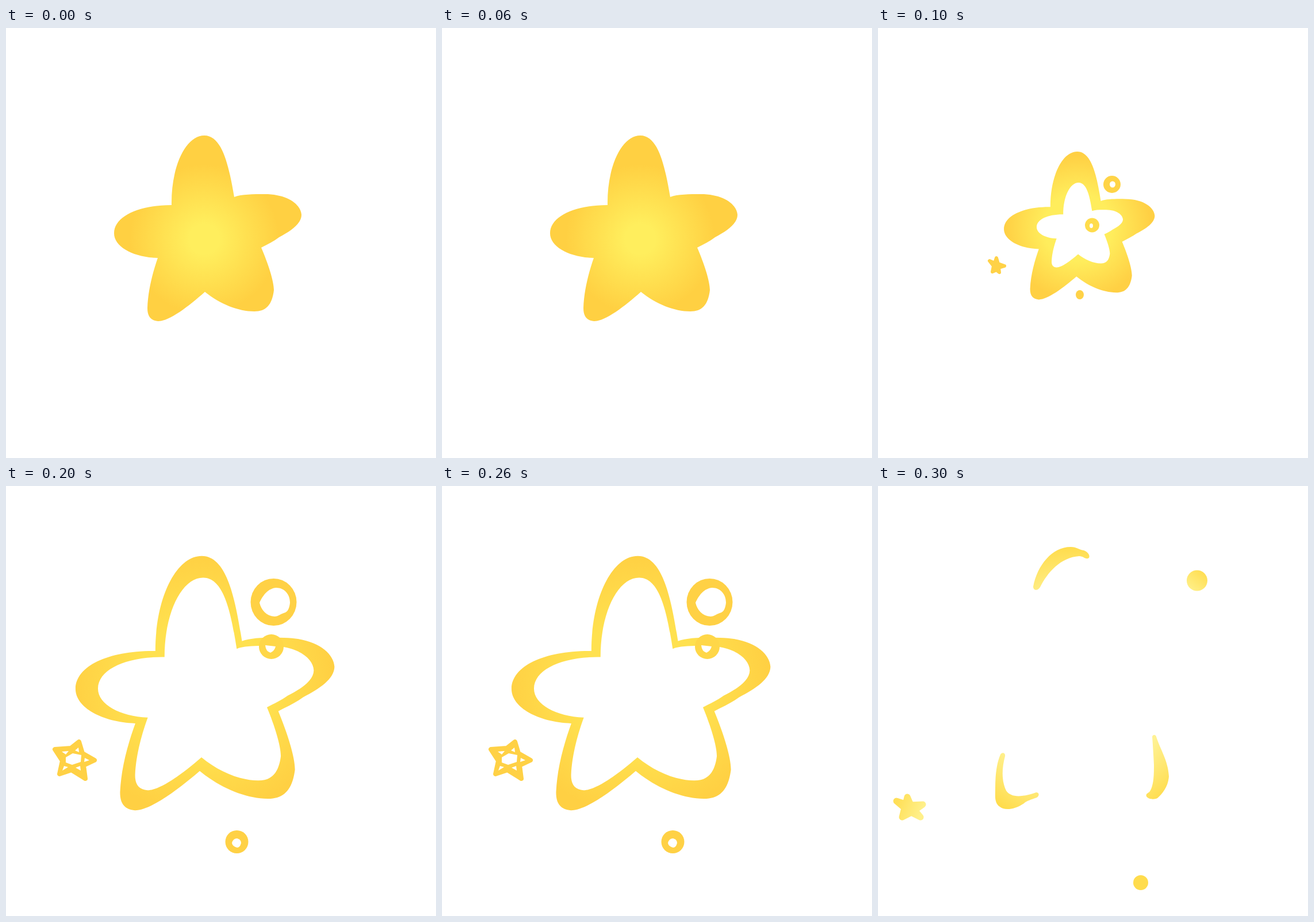
An HTML page for the animation above (0.4 s loop, 748 by 748 pixels).

```html
<!DOCTYPE html>
<html lang="en">
<head>
<meta charset="utf-8">
<title>Star burst</title>
<style>
  html, body { margin: 0; width: 100%; height: 100%; overflow: hidden; background: #fff; }
  svg { display: block; width: 100%; height: 100%; }
  .pose { visibility: hidden; }
  .pose.on { visibility: visible; }
  .hole { fill: #fff; }
  .line { stroke-linecap: round; stroke-linejoin: round; }
</style>
</head>
<body>
<svg viewBox="0 0 748 748">
  <defs>
    <path id="star" d="M288 308C287 240 313 187 345 187C377 187 388 242 397 294C410 289 430 289 450 289
      C490 289 513 307 514 325C514 340 496 353 475 364C466 371 455 376 444 382C456 410 466 440 466 456
      C463 482 452 493 432 493C404 493 372 480 346 459C318 484 284 510 265 510C252 509 246 502 246 487
      C247 455 256 423 264 400C222 399 188 381 188 357C188 328 230 308 288 308Z"/>
    <radialGradient id="solid" gradientUnits="userSpaceOnUse" cx="345" cy="367" r="130">
      <stop offset=".2" stop-color="#ffee5d"/><stop offset="1" stop-color="#ffd042"/>
    </radialGradient>
    <!-- gradients on the scaled stars use the star's own coordinates -->
    <radialGradient id="thick" gradientUnits="userSpaceOnUse" cx="348" cy="352" r="157">
      <stop offset=".47" stop-color="#ffed5c"/><stop offset="1" stop-color="#ffd044"/>
    </radialGradient>
    <radialGradient id="thin" gradientUnits="userSpaceOnUse" cx="348" cy="350" r="165">
      <stop offset=".5" stop-color="#ffe14f"/><stop offset="1" stop-color="#ffd043"/>
    </radialGradient>
    <radialGradient id="fade" gradientUnits="userSpaceOnUse" cx="345" cy="350" r="245">
      <stop offset=".66" stop-color="#fff294"/><stop offset="1" stop-color="#ffdc4c"/>
    </radialGradient>
    <linearGradient id="dotFade" x1="0" y1="1" x2=".8" y2="0">
      <stop offset="0" stop-color="#fff28f"/><stop offset="1" stop-color="#ffdd50"/>
    </linearGradient>
    <linearGradient id="starFade" x1="0" y1=".3" x2="1" y2=".6">
      <stop offset="0" stop-color="#ffdf57"/><stop offset="1" stop-color="#fff08a"/>
    </linearGradient>
  </defs>

  <g class="pose on">
    <use href="#star" fill="url(#solid)"/>
  </g>

  <g class="pose" fill="#ffd247">
    <use href="#star" fill="url(#thick)" transform="translate(67.9 65.6) scale(.804 .799) rotate(.6 345 355)"/>
    <use href="#star" class="hole" transform="translate(189.5 183.4) scale(.46 .458) rotate(.6 345 355)"/>
    <circle cx="407" cy="272" r="15" fill="#ffd447"/>
    <ellipse class="hole" cx="408" cy="272" rx="5" ry="5.5"/>
    <circle cx="372.5" cy="343" r="12.5" fill="#ffdc4c"/>
    <ellipse class="hole" cx="371" cy="344" rx="3" ry="4"/>
    <ellipse cx="351" cy="464" rx="7" ry="8"/>
    <path class="line" stroke="#ffd247" stroke-width="6"
      d="M194 405L203 409 206 400 209 410 220 414 210 417 211 425 206 421 199 424 201 414Z"/>
  </g>

  <g class="pose" fill="#ffd145">
    <use href="#star" fill="url(#thin)" transform="translate(-138.5 -135.5) scale(1.38 1.375) rotate(.8 345 355)"/>
    <use href="#star" class="hole" transform="translate(-56.2 -55.5) scale(1.15 1.149) rotate(.8 345 355)"/>
    <ellipse cx="465.5" cy="202" rx="40" ry="41"/>
    <path class="hole" d="M441 203C447 190 456 178 470 177C484 177 494 188 494 203C493 213 490 218 486 220
      C478 222 474 227 467 227C453 226 444 216 441 203Z"/>
    <circle cx="461.5" cy="279.5" r="21.5" fill="#ffd748"/>
    <path class="hole" d="M451 277L469 279Q467 287 460 290Q452 288 451 277Z"/>
    <circle cx="401.5" cy="619" r="20"/>
    <path class="hole" d="M393 621Q395 613 402 613Q409 615 409 621Q407 629 402 629Q394 627 393 621Z"/>
    <path class="line" stroke="#ffd145" stroke-width="8"
      d="M85 458L113 456 127 445 133 465 154 477 135 486 138 509 114 494 93 501 98 478Z"/>
    <path class="hole" d="M104 472L116 465 131 468 130 480 115 485 104 481ZM97 462L109 461 104 467Z
      M120 460L126 455 127 463ZM137 473L145 477 136 480ZM101 487L108 489 98 495ZM121 490L129 487 130 495Z"/>
  </g>

  <g class="pose" fill="url(#fade)">
    <path d="M270 175C277 138 303 106 335 106C346 106 350 111 358 112C366 115 369 121 367 125
      C361 129 358 122 350 122C318 124 295 150 282 176C278 183 270 182 270 175Z"/>
    <path d="M213 467C216 462 222 464 221 470C215 492 215 514 223 530C231 542 250 542 275 533
      C281 533 281 539 276 542C266 546 259 547 254 552C238 563 220 565 212 558C202 551 204 540 204 525
      C204 505 206 483 213 467Z"/>
    <path d="M477 436C478 432 483 432 484 436C490 456 505 478 506 505C505 522 496 534 486 543
      C480 546 470 545 467 540C465 535 470 535 473 531C480 520 480 500 480 485C479 465 478 450 477 436Z"/>
    <circle cx="555" cy="164.5" r="18" fill="url(#dotFade)"/>
    <circle cx="457" cy="690" r="13" fill="#ffdc4d"/>
    <path class="line" fill="url(#starFade)" stroke="url(#starFade)" stroke-width="11"
      d="M32 548L48 553 51 541 57 555 78 554 64 564 74 576 58 568 42 576 46 560Z"/>
  </g>
</svg>
<script>
  const POSE_MS = 100;
  const poses = [...document.querySelectorAll('.pose')];
  const start = performance.now();

  function draw() {
    const elapsed = Math.max(0, performance.now() - start);
    const current = Math.floor(elapsed / POSE_MS) % poses.length;
    poses.forEach((pose, i) => pose.classList.toggle('on', i === current));
    requestAnimationFrame(draw);
  }
  draw();
</script>
</body>
</html>
```
